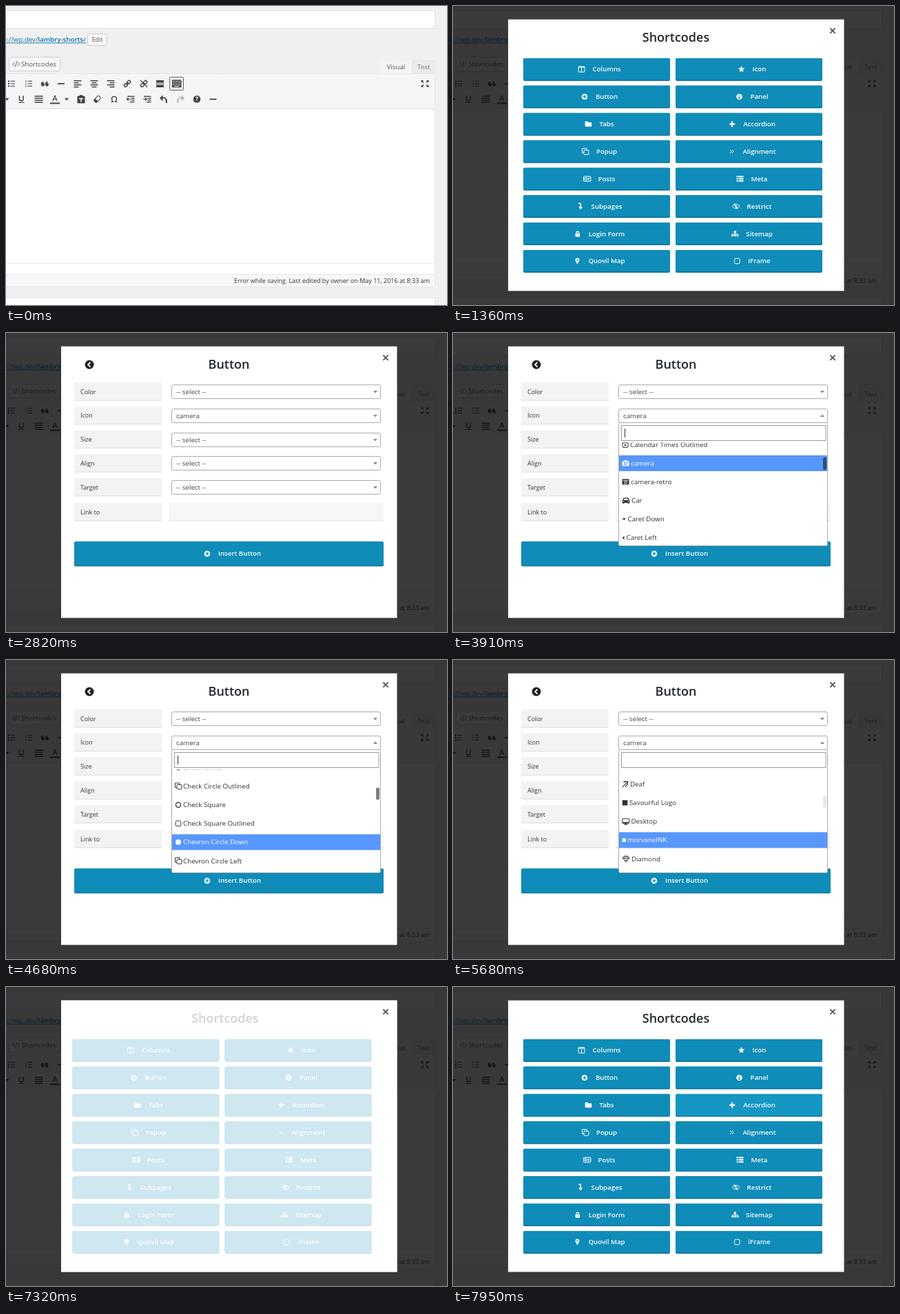
An HTML page with a canvas for the animation above (8 s loop, 640 by 435 pixels).

```html
<!DOCTYPE html>
<html lang="en">
<head>
<meta charset="utf-8">
<title>Shortcodes</title>
<style>
html, body { margin: 0; width: 100%; height: 100%; overflow: hidden; background: #f1f1f1; }
canvas { position: absolute; left: 0; top: 0; width: 640px; height: 435px; }
</style>
</head>
<body>
<canvas id="page"></canvas>
<canvas id="modal"></canvas>
<script>
const W = 640, H = 435, LOOP = 8000, TAU = Math.PI * 2;
const BLUE = '#0f8cb8', INK = '#333', ICON = '#444';
const DPR = window.devicePixelRatio || 1;
let g;

function setup(id) {
  const c = document.getElementById(id);
  c.width = W * DPR;
  c.height = H * DPR;
  const ctx = c.getContext('2d');
  ctx.scale(DPR, DPR);
  return ctx;
}

// Drawing helpers
function box(x, y, w, h, fill, stroke, r = 0) {
  g.beginPath();
  g.roundRect(x, y, w, h, r);
  if (fill) { g.fillStyle = fill; g.fill(); }
  if (stroke) { g.strokeStyle = stroke; g.lineWidth = 1; g.stroke(); }
}
function disc(x, y, r, fill) {
  g.beginPath();
  g.arc(x, y, r, 0, TAU);
  g.fillStyle = fill;
  g.fill();
}
function poly(pts, fill) {
  g.beginPath();
  for (let i = 0; i < pts.length; i += 2) g.lineTo(pts[i], pts[i + 1]);
  g.closePath();
  g.fillStyle = fill;
  g.fill();
}
function line(pts, color, w = 1) {
  g.beginPath();
  for (let i = 0; i < pts.length; i += 2) g.lineTo(pts[i], pts[i + 1]);
  g.strokeStyle = color;
  g.lineWidth = w;
  g.stroke();
}
function arc(x, y, r, a, b, color, w = 1) {
  g.beginPath();
  g.arc(x, y, r, a, b);
  g.strokeStyle = color;
  g.lineWidth = w;
  g.stroke();
}
// y is the middle of the capitals; returns the width
function text(s, x, y, size, color, align = 'left', weight = 400) {
  g.font = `${weight} ${size}px "Open Sans", sans-serif`;
  g.textAlign = align;
  g.textBaseline = 'alphabetic';
  g.fillStyle = color;
  g.fillText(s, x, y + size * 0.35);
  return g.measureText(s).width;
}
function at(x, y, draw, ...args) {
  g.save();
  g.translate(x, y);
  draw(...args);
  g.restore();
}

// Icons: drawn around 0,0 with colour c and hole colour b
const icons = {
  columns(c) { box(-4.5, -4, 9, 8, null, c, 1); line([-4.5, -3.4, 4.5, -3.4], c, 1.6); line([0, -4, 0, 4], c); },
  plusCircle(c, b) { disc(0, 0, 4.3, c); line([-2.5, 0, 2.5, 0], b, 1.4); line([0, -2.5, 0, 2.5], b, 1.4); },
  folder(c) { box(-4.8, -2.6, 9.6, 6.4, c, null, 1); box(-4.8, -4, 4.4, 3, c, null, 1); },
  clone(c) { line([-2, 2, -4.5, 2, -4.5, -4.5, 2, -4.5, 2, -2], c); box(-2, -2, 7, 6.5, null, c, 1); },
  news(c) { box(-5, -3.5, 10.5, 7, null, c, 1); box(-3.3, -1.6, 3, 3, null, c); for (const y of [-1.5, 0, 1.5]) line([1, y, 4, y], c, .8); },
  levelDown(c) { line([-2.5, -4, 0.5, -4, 0.5, 2], c, 1.5); poly([-2.5, 1, 3.5, 1, 0.5, 4.8], c); },
  lock(c) { box(-3.3, -0.5, 6.6, 5, c, null, .8); arc(0, -1, 2, Math.PI, TAU, c, 1.4); },
  marker(c, b) { disc(0, -1.6, 2.9, c); poly([-2.7, -0.8, 2.7, -0.8, 0, 4.8], c); disc(0, -1.6, 1.1, b); },
  star(c) {
    const p = [];
    for (let i = 0; i < 10; i++) {
      const r = i % 2 ? 2.2 : 5, a = i * TAU / 10 - TAU / 4;
      p.push(r * Math.cos(a), r * Math.sin(a));
    }
    poly(p, c);
  },
  info(c, b) { disc(0, 0, 4.3, c); box(-.8, -3, 1.6, 1.4, b); box(-.8, -.7, 1.6, 3.4, b); box(-1.4, 2, 2.8, .9, b); },
  plus(c) { line([-4, 0, 4, 0], c, 2.2); line([0, -4, 0, 4], c, 2.2); },
  angles(c) { for (const x of [-2.4, .6]) line([x, -2.5, x + 2.3, 0, x, 2.5], c); },
  list(c) { for (const y of [-3.4, -.2, 3]) { box(-5, y - 1, 2.2, 2, c); box(-2, y - 1, 7, 2, c); } },
  eyeSlash(c) {
    g.beginPath();
    g.ellipse(0, 0, 5, 3, 0, 0, TAU);
    g.strokeStyle = c; g.lineWidth = 1; g.stroke();
    disc(0, 0, 1.5, c);
    line([-2.5, -4, 2.5, 4], c, 1.1);
  },
  sitemap(c) { box(-1.5, -4, 3, 3, c); for (const x of [-3.7, 0, 3.7]) box(x - 1.4, 1.2, 2.8, 2.8, c); line([-3.7, 1.5, -3.7, .2, 3.7, .2, 3.7, 1.5], c, .8); line([0, -1, 0, 1], c, .8); },
  square(c) { box(-3.8, -3.8, 7.6, 7.6, null, c, 1.5); },
  calendar(c) { box(-4, -3.5, 8, 7.5, null, c, .5); line([-4, -3, 4, -3], c, 1.8); line([-1.5, -.7, 1.5, 2.3], c); line([1.5, -.7, -1.5, 2.3], c); },
  camera(c, b) { box(-5, -3, 10, 7, c, null, 1.2); box(-2.3, -4.3, 4.6, 2.5, c, null, .8); disc(0, .4, 2.5, b); disc(0, .4, 1.5, c); },
  retro(c, b) { box(-5, -4, 10, 8, c, null, .8); line([-4, -1.9, 4, -1.9], b, .8); disc(0, .8, 2.2, b); disc(0, .8, 1.3, c); },
  car(c, b) { poly([-3.6, -4, 3.6, -4, 4.8, 0, -4.8, 0], c); poly([-2.6, -2.8, 2.6, -2.8, 3.2, -.5, -3.2, -.5], b); box(-5.5, -.5, 11, 3.8, c, null, 1); box(-4.7, 2, 2.2, 2.6, c); box(2.5, 2, 2.2, 2.6, c); disc(-3.5, 1.2, .8, b); disc(3.5, 1.2, .8, b); },
  caretDown(c) { poly([-2.8, -1.4, 2.8, -1.4, 0, 1.6], c); },
  caretLeft(c) { poly([1.3, -2.8, 1.3, 2.8, -1.5, 0], c); },
  deaf(c) { arc(.6, -1, 2.9, -2.8, 1.2, c, 1.4); line([1.8, 1.8, 0, 4.2], c, 1.4); line([-4.5, 4.5, 4.5, -4.5], c, 1.1); },
  block(c) { box(-3.8, -3.8, 7.6, 7.6, c); },
  mark(c) { box(-2.6, -2.6, 5.2, 5.2, c); },
  desktop(c) { box(-5, -4, 10, 6.4, null, c, 1); line([-5, 2, 5, 2], c, 1.6); line([0, 2, 0, 4.5], c, 2.4); line([-2.5, 4.4, 2.5, 4.4], c); },
  diamond(c) { line([-3, -3.8, 3, -3.8, 5, -1, 0, 4.6, -5, -1, -3, -3.8], c); line([-5, -1, 5, -1], c, .9); line([-1.2, -3.8, -2, -1, 0, 4.2, 2, -1, 1.2, -3.8], c, .7); },
  dot(c) { disc(0, 0, 4, c); },
  ring(c) { arc(0, 0, 3.6, 0, TAU, c, 1.3); }
};
const icon = (name, x, y, c, b) => at(x, y, icons[name], c, b);

// Editor page behind the dialog
function bars(x, y, widths, align) {
  widths.forEach((w, i) => {
    const dx = align === 'right' ? 5.5 - w : align === 'center' ? -w / 2 : -5.5;
    box(x + dx, y - 5 + i * 3, w, 1.5, ICON);
  });
}
function bullets(x, y, numbered) {
  for (const d of [-3.6, 0, 3.6]) {
    if (numbered) line([x - 4, y + d - 1.4, x - 4, y + d + 1.4], ICON, .8);
    else box(x - 5, y + d - 1, 2, 2, ICON);
    box(x - 1.5, y + d - .6, 6.5, 1.1, ICON);
  }
}
function chain(x, y, broken) {
  at(x, y, () => {
    g.rotate(-Math.PI / 4);
    for (const d of [-5.7, .3]) {
      g.beginPath();
      g.roundRect(d, -2, 5.4, 4, 2);
      g.strokeStyle = ICON; g.lineWidth = 1.4; g.stroke();
    }
    if (!broken) line([-2.5, 0, 2.5, 0], ICON, 1.3);
  });
  if (broken) line([x - 5, y - 5, x + 5, y + 5], ICON, 1.2);
}
function dent(x, y, dir) {
  line([x - 5, y - 4, x + 5.5, y - 4], ICON, 1.4);
  line([x + .5, y - 1.2, x + 5.5, y - 1.2], ICON, 1.4);
  line([x + .5, y + 1.4, x + 5.5, y + 1.4], ICON, 1.4);
  line([x - 1, y + 4.2, x + 5.5, y + 4.2], ICON, 1.4);
  line([x - 6, y, x - .5, y], ICON, 1.2);
  const tip = dir > 0 ? x : x - 6.5;
  poly([tip, y, tip - 3 * dir, y - 2.7, tip - 3 * dir, y + 2.7], ICON);
}
function hook(x, y, dir, c) {
  at(x, y, () => {
    g.scale(dir, 1);
    g.beginPath();
    g.moveTo(-4, -1.5);
    g.bezierCurveTo(2, -3.5, 5, 0, 3.5, 5.5);
    g.strokeStyle = c; g.lineWidth = 1.9; g.stroke();
    poly([-6, -1.5, -1.5, -6, -1.5, 3], c);
  });
}
function topRow(y) {
  bullets(8, y);
  bullets(33, y, true);
  for (const x of [53.5, 59.5]) { disc(x, y + 1.5, 2.4, ICON); arc(x + 1, y + 1, 3.3, Math.PI, 4.8, ICON, 1.4); }
  box(75, y - .8, 10, 1.8, ICON);
  ['left', 'center', 'right'].forEach((a, i) => bars(104 + i * 24, y, [11, 7, 11, 7], a));
  chain(176, y);
  chain(200, y, true);
  box(218, y - 5, 11, 3.6, ICON);
  for (const x of [218, 221, 224, 227]) box(x, y - .5, 2, 1.2, ICON);
  box(218, y + 1.7, 11, 3.6, ICON);
  box(237.5, y - 9.5, 20, 19, '#ebebeb', '#666', 1);
  box(241, y - 5.5, 13.5, 11, ICON, null, 1);
  for (let r = 0; r < 3; r++)
    for (let i = 0; i < 5; i++) box(242.2 + i * 2.4, y - 4 + r * 2.5, 1.3, 1.3, '#ebebeb');
  box(244, y + 3.5, 7.5, 1, '#ebebeb');
  for (const sx of [-1, 1]) for (const sy of [-1, 1]) {
    const X = 608 + sx * 5.5, Y = y + sy * 5;
    line([608 + sx * 1.8, y + sy * 1.6, X - sx, Y - sy], ICON, 1.3);
    poly([X, Y, X - sx * 3.6, Y, X, Y - sy * 3.6], ICON);
  }
}
function bottomRow(y) {
  poly([-2, y - 1.5, 4.5, y - 1.5, 1.3, y + 2], ICON);
  line([19.5, y - 5, 19.5, y], ICON, 1.6);
  line([25, y - 5, 25, y], ICON, 1.6);
  arc(22.25, y, 2.75, 0, Math.PI, ICON, 1.6);
  line([18, y + 5, 26.5, y + 5], ICON);
  bars(47, y, [12, 12, 12, 12], 'left');
  text('A', 71, y - 1, 11, ICON, 'center', 600);
  box(64, y + 5, 14, 2, ICON);
  poly([85, y - 1.5, 91, y - 1.5, 88, y + 2], ICON);
  box(103.5, y - 4.5, 11, 10.5, ICON, null, 1);
  box(106.5, y - 6, 5, 3, ICON, null, 1);
  line([106, y - .8, 112, y - .8], '#fff', 1.5);
  line([109, y - .8, 109, y + 4], '#fff', 1.5);
  at(132.5, y, () => {
    g.rotate(-Math.PI / 4);
    box(-5, -2.6, 10, 5.2, '#f5f5f5', ICON, 1.2);
    box(-5, -2.6, 3.5, 5.2, ICON);
  });
  text('Ω', 157, y, 12.5, ICON, 'center', 600);
  dent(181, y, -1);
  dent(205, y, 1);
  hook(229, y, 1, ICON);
  hook(253, y, -1, '#b4b4b4');
  disc(277, y, 5.3, ICON);
  text('?', 277, y, 8.5, '#fff', 'center', 700);
  box(295.5, y - .8, 10, 1.8, ICON);
}
function drawPage() {
  g.clearRect(0, 0, W, H);
  box(0, 0, W, H, '#f1f0f1');
  box(-5, 6.5, 627.5, 26, '#fff', '#ddd');
  const link = '#0073aa';
  text('http://wp.dev/', 46.5, 49, 9.7, link, 'right');
  text('lambry-shorts/', 46.5, 49, 9.7, link, 'left', 600);
  line([0, 53.8, 116, 53.8], link, .9);
  box(118.5, 40.5, 28, 17, '#f7f7f7', '#ccc', 2);
  text('Edit', 132.5, 49, 8.8, '#555', 'center');
  box(4.5, 74.5, 74, 20, '#f7f7f7', '#ccc', 2);
  line([12.5, 81.5, 10, 84.5, 12.5, 87.5], '#666');
  line([15.5, 80.5, 13.7, 88.5], '#666');
  line([17, 81.5, 19.5, 84.5, 17, 87.5], '#666');
  text('Shortcodes', 22, 84.5, 9.7, '#555');
  box(543.5, 79.5, 46, 19, '#f5f5f5');
  box(589.5, 79.5, 33, 19, '#ebebeb', '#e5e5e5');
  text('Visual', 552.5, 89, 9.75, '#555');
  text('Text', 597, 89, 9.75, '#777');
  box(-5, 98.5, 627.5, 310, '#fff', '#e5e5e5');
  box(-5, 99, 627, 51, '#f5f5f5');
  line([0, 149.5, 622, 149.5], '#dedede');
  topRow(113);
  bottomRow(135.5);
  line([0, 374.5, 622, 374.5], '#ececec');
  box(-5, 390.5, 627.5, 18, '#f7f7f7', '#e5e5e5');
  text('Error while saving. Last edited by owner on May 11, 2016 at 8:33 am', 615, 399.5, 9, INK, 'right');
  box(-5, 424.5, 627.5, 20, '#fff', '#e5e5e5');
}

// Dialog
const GRID = [
  ['columns', 'Columns', 'star', 'Icon'],
  ['plusCircle', 'Button', 'info', 'Panel'],
  ['folder', 'Tabs', 'plus', 'Accordion'],
  ['clone', 'Popup', 'angles', 'Alignment'],
  ['news', 'Posts', 'list', 'Meta'],
  ['levelDown', 'Subpages', 'eyeSlash', 'Restrict'],
  ['lock', 'Login Form', 'sitemap', 'Sitemap'],
  ['marker', 'Quovil Map', 'square', 'iFrame']
];
const PICK = 'morvaneINK';
const dirs = (pre, order) => order.map(d => pre + d);
const OPTIONS = [
  ...'Calendar Times Outlined|camera|camera-retro|Car|Caret Down|Caret Left|Caret Right'.split('|'),
  ...dirs('Caret Square Outlined ', ['Down', 'Left', 'Right', 'Up']),
  ...'Caret Up|Cart Arrow Down|Cart Plus|Closed Captions|certificate|Chain Broken|Check|Check Circle|Check Circle Outlined|Check Square|Check Square Outlined'.split('|'),
  ...dirs('Chevron Circle ', ['Down', 'Left', 'Right', 'Up']),
  ...dirs('chevron-', ['down', 'left', 'right', 'up']),
  ...'Child|Circle|Circle Outlined|Circle Outlined Notched|Circle Thin|Clipboard|Clock Outlined|Clone|Cloud|Cloud Download|Cloud Upload|Code|code-fork|Coffee|cog|cogs|Columns|comment|comment-o|Commenting|Commenting Outlined|comments|comments-o|Compass|Compress|Copy|Copyright|credit-card|Credit Card|crop|Crosshairs|Cube|Cubes|Cut|Cutlery|Dashboard|Database|Deaf|Savourful Logo|Desktop'.split('|'),
  PICK, 'Diamond', 'Dot Circle Outlined', 'Download'
];
// option: [icon, icon width]
const OPTION_ICONS = {
  'Calendar Times Outlined': ['calendar', 9], camera: ['camera', 10], 'camera-retro': ['retro', 10],
  Car: ['car', 11], 'Caret Down': ['caretDown', 5.5], 'Caret Left': ['caretLeft', 3.5],
  Deaf: ['deaf', 9], 'Savourful Logo': ['block', 8], Desktop: ['desktop', 10.5],
  [PICK]: ['mark', 5.5], Diamond: ['diamond', 11]
};
const SPARE = ['ring', 'square', 'dot', 'clone'];
const STEP = 27.15, FIRST_Y = 162.3;
const SCROLL = FIRST_Y + STEP * OPTIONS.indexOf('Deaf') - 180.6;
const T = { open: 870, leave: 1950, form: 2220, drop: 3620, scroll: 4250, stop: 5500, pick: 6100, back: 6930, home: 7270, hover: 7800 };

const ramp = (t, a, d) => Math.min(1, Math.max(0, (t - a) / d));
const smooth = p => p * p * (3 - 2 * p);

function blueButton(x, y, w, h, name, label, cx, hot) {
  box(x, y, w, h, '#0a7299', null, 2);
  box(x, y, w, h - 1.5, hot ? '#1597c3' : BLUE, null, 2);
  const mid = y + h / 2 - .4;
  const tw = text(label, cx, mid, 9.7, '#fff', 'center', 600);
  icon(name, cx - tw / 2 - 16, mid, '#fff', BLUE);
}
function gridView(t) {
  text('Shortcodes', 323.5, 45.5, 18, '#23282d', 'center', 600);
  GRID.forEach(([li, l, ri, r], i) => {
    const y = 76 + i * 39.85;
    blueButton(102, y, 213, 33, li, l, 223);
    blueButton(323, y, 213, 33, ri, r, 444.5, r === 'Accordion' && t > T.hover);
  });
}
function select(y, value, open) {
  box(240.5, y + .5, 303, 20, '#fff', '#aaa', 2.5);
  text(value, 247, y + 10.8, 9.75, '#444');
  const d = open ? -1 : 1, m = y + 10.5;
  poly([533, m - 1.5 * d, 539, m - 1.5 * d, 536, m + 2 * d], '#888');
}
function dropdown(t) {
  box(240.5, 130.5, 303, 179, '#fff', '#aaa', 2);
  box(244.5, 134.5, 296.5, 22, '#fff', '#999');
  if ((t - T.drop) % 1060 < 530) line([249.5, 139, 249.5, 152], '#333');

  const p = smooth(ramp(t, T.scroll, T.stop - T.scroll));
  const s = SCROLL * p;
  const hot = t < T.scroll ? 1 : Math.round((262 + s - FIRST_Y) / STEP);
  g.save();
  g.beginPath();
  g.rect(241, 159.5, 302, 149.5);
  g.clip();
  OPTIONS.forEach((label, i) => {
    const y = FIRST_Y + i * STEP - s;
    if (y < 140 || y > 325) return;
    if (i === hot) box(241, y - 11.5, 302, 23, '#5897fb');
    const c = i === hot ? '#fff' : INK;
    const [name, w] = OPTION_ICONS[label] || [SPARE[i % SPARE.length], 9];
    icon(name, 245.5 + w / 2, y, c, i === hot ? '#5897fb' : '#fff');
    text(label, 248 + w, y, 9.75, c);
  });
  g.restore();
  const shade = .5 - .41 * ramp(t, T.stop, 170);
  box(537, 181 + 16 * p, 5, 18, `rgba(0,0,0,${shade})`, null, 2.5);
}
function formView(t) {
  disc(121, 46, 6.5, '#222');
  line([122.5, 42.6, 119, 46, 122.5, 49.4], '#fff', 1.8);
  text('Button', 323.5, 45.5, 18, '#23282d', 'center', 600);
  const open = t >= T.drop && t < T.pick;
  const chosen = t < T.pick ? 'camera' : PICK;
  ['Color', 'Icon', 'Size', 'Align', 'Target', 'Link to'].forEach((label, i) => {
    const y = 72 + i * 34.75 + (i === 5 ? 1.2 : 0);
    box(99, y, 127, 26.5, '#f3f3f3');
    line([99, y + 26, 226, y + 26], '#ddd');
    text(label, 108, y + 13.5, 9, INK);
    if (i === 5) {
      box(236, y, 312, 26.5, '#f7f7f7');
      line([236, y + 26, 548, y + 26], '#ddd');
    } else {
      select(Math.round(y + 3), i === 1 ? chosen : '-- select --', i === 1 && open);
    }
  });
  blueButton(99, 303.5, 449, 36, 'plusCircle', 'Insert Button', 339);
  if (open) dropdown(t);
}
// The panel is white, so a white veil fades a whole view
function view(draw, t, shown, side) {
  g.save();
  g.translate(side * 7 * (1 - shown), 0);
  draw(t);
  g.restore();
  box(80, 19.5, 487.5, 395, `rgba(255,255,255,${1 - shown})`);
}
function drawModal(t) {
  g.clearRect(0, 0, W, H);
  g.canvas.style.opacity = smooth(ramp(t, T.open, 260));
  box(0, 0, W, H, 'rgba(11,10,12,.8)');
  box(80, 19.5, 487.5, 395, '#fff');
  if (t < T.form) view(gridView, t, 1 - ramp(t, T.leave, 255), -1);
  else if (t < T.home) view(formView, t, Math.min(ramp(t, T.form, 250), 1 - ramp(t, T.back, 250)), 1);
  else view(gridView, t, ramp(t, T.home, 250), -1);
  line([547.3, 32.3, 554.7, 39.7], '#555', 1.8);
  line([554.7, 32.3, 547.3, 39.7], '#555', 1.8);
}

const page = setup('page'), modal = setup('modal');
g = page;
drawPage();
g = modal;
const start = performance.now();
function frame() {
  drawModal((performance.now() - start) % LOOP);
  requestAnimationFrame(frame);
}
frame();
</script>
</body>
</html>
```
